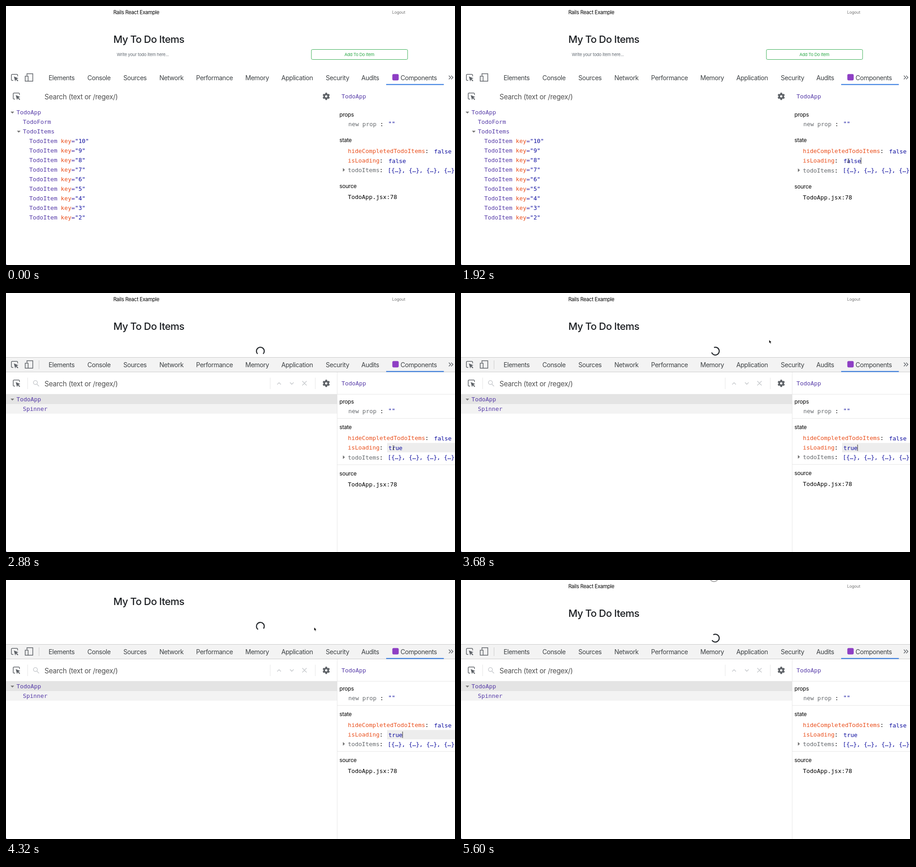
An HTML page for the animation above (5.76 s loop, 985 by 569 pixels).

```html
<!DOCTYPE html>
<html lang="en">
<head>
<meta charset="utf-8">
<title>To do items with component inspector</title>
<style>
html, body { margin: 0; width: 100%; height: 100%; overflow: hidden; background: #fff; }
svg { display: block; width: 985px; height: 569px; }
text { font-family: Inter, Roboto, sans-serif; white-space: pre; }
.brand { font-size: 11.2px; letter-spacing: -.28px; fill: #000; }
.logout { font-size: 9px; letter-spacing: -.15px; fill: #777; }
.title { font-size: 22px; font-weight: 500; letter-spacing: -.57px; fill: #1b1e22; }
.form { font-size: 9.4px; letter-spacing: -.22px; fill: #626a72; }
.tab { font-size: 13.9px; letter-spacing: -.4px; fill: #3c4043; }
.search { font-size: 15.2px; letter-spacing: -.28px; fill: #505050; }
.label { font-size: 12px; letter-spacing: -.2px; fill: #000; }
.mono { font: 12.8px "DejaVu Sans Mono", monospace; fill: #000; }
.name { fill: #563ba8; }
.attr { fill: #ea4f1c; }
.value { fill: #0d0d9f; }
.dim { fill: #666a6e; }
.icon { fill: none; stroke: #5f6368; stroke-width: 1.5; }
.faint { fill: none; stroke: #c3c6ca; stroke-width: 1.4; }
.line { fill: none; stroke: #e6e6e6; }
</style>
</head>
<body>
<svg viewBox="0 0 985 569">
  <g id="page">
    <text class="brand" x="235.5" y="18">Rails React Example</text>
    <text class="logout" x="847" y="17.3">Logout</text>
    <text class="title" x="235.5" y="81">My To Do Items</text>
    <g id="form">
      <text class="form" x="243" y="110">Write your todo item here...</text>
      <rect x="670" y="95.5" width="211" height="22" rx="2.5" fill="#fff" stroke="#3aae55"/>
      <text class="form" x="775.3" y="110" text-anchor="middle" style="fill:#28a745">Add To Do Item</text>
    </g>
    <path id="spinner" d="M6.1 6.1A8.6 8.6 0 1 1 6.1 -6.1" fill="none" stroke="#212529" stroke-width="2.3"/>
  </g>
  <circle id="ring" cx="555" cy="-6.3" r="10" fill="#fff" stroke="#555"/>

  <rect y="141" width="985" height="428" fill="#fff"/>
  <g id="chrome">
    <rect y="141" width="985" height="32.5" fill="#f3f3f3"/>
    <path d="M0 141.5H985M0 173.5H985M72.5 148V167" stroke="#cbcbcb"/>
    <path class="line" d="M47.5 186V211M579.5 186V211M678.5 186V211M726.5 174V569M0 222.5H985M727 275.5H985"/>
    <path class="faint" d="M67.5 200L72.5 205M595 201L599 197L603 201M623 196.5L627 200.5L631 196.5M650 193.5L659.5 203M659.5 193.5L650 203"/>
    <circle class="faint" cx="64.5" cy="196.7" r="4.3"/>
    <rect y="223" width="726" height="21" fill="#e4e4e4"/>
    <rect y="244" width="726" height="21" fill="#f3f3f3"/>
  </g>

  <g id="picker">
    <path class="icon" d="M5 14H2.5Q.8 14 .8 12.3V2.5Q.8 .8 2.5 .8H12.8Q14.5 .8 14.5 2.5V5"/>
    <path d="M6.3 5.3L16.2 9.3L12.3 10.8L16 14.5L14.5 16L10.8 12.3L9.2 16.2Z" fill="#5f6368"/>
  </g>
  <use href="#picker" x="4" y="41"/>
  <path class="icon" d="M46 153V148.7H58.7V165.3H49M42.2 154.2H48.5V165.3H42.2Z"/>
  <g id="tabs"></g>
  <rect x="847.5" y="149.5" width="14" height="14" rx="3" fill="#8e3fc4"/>
  <rect x="834" y="171.5" width="126.5" height="2" fill="#2b74de"/>
  <path class="icon" d="M971.5 153L975.5 157L971.5 161M976.5 153L980.5 157L976.5 161"/>
  <text class="search" x="84.5" y="204.5">Search (text or /regex/)</text>
  <g transform="translate(702.5 198.5)">
    <g id="teeth" fill="#5f6368"></g>
    <circle r="4.3" fill="none" stroke="#5f6368" stroke-width="3.4"/>
  </g>

  <path d="M10 232H18L14 236.3Z" fill="#777"/>
  <text class="mono name" x="23" y="238">TodoApp</text>
  <g id="tree"><path d="M24 274H32L28 278.3Z" fill="#777"/></g>
  <text id="loading" class="mono name" x="37" y="259">Spinner</text>

  <text class="mono name" x="736" y="203">TodoApp</text>
  <text class="label" x="731.5" y="243">props</text>
  <text class="mono dim" x="751" y="264">new prop</text>
  <text class="mono" x="820.5" y="264">:</text>
  <text class="mono value" x="838.5" y="263">""</text>
  <text class="label" x="731.5" y="299">state</text>
  <text class="mono attr" x="750" y="323">hideCompletedTodoItems<tspan fill="#000">:</tspan></text>
  <text class="mono value" x="939" y="323.5">false</text>
  <text class="mono attr" x="750" y="344">isLoading<tspan fill="#000">:</tspan></text>
  <rect id="field" x="836" y="329.5" width="149" height="20.5" fill="#ededed"/>
  <rect id="selection" x="839" y="332" width="38.5" height="15.5" fill="#b3d7ff"/>
  <text id="flag" class="mono value" x="839" y="344.5"></text>
  <path id="caret" d="M0 333V347" stroke="#222"/>
  <g id="lower">
    <path id="rule" class="line" d="M727 376.5H985"/>
    <path d="M739 356L743.5 360L739 364Z" fill="#777"/>
    <text class="mono dim" x="750" y="365">todoItems<tspan fill="#000">:</tspan></text>
    <text class="mono value" x="837.5" y="364.5">[{…}, {…}, {…}, {…}</text>
    <text class="label" x="731.5" y="400">source</text>
    <text class="mono" x="750" y="424">TodoApp.jsx:78</text>
  </g>
  <circle cy="569" r="1.5" fill="#34309a"/>

  <path id="arrow" d="M0 0V7.2L1.7 5.7L2.9 8.4L4.2 7.8L3 5.2H5.2Z" fill="#000" stroke="#fff" stroke-width=".5"/>
  <path id="beam" d="M-2 -4.5Q0 -4.5 0 -3Q0 -4.5 2 -4.5M0 -3V3M-2 4.5Q0 4.5 0 3Q0 4.5 2 4.5M-1.3 1H1.3" fill="none" stroke="#333" stroke-width=".9"/>
</svg>
<script>
const LOOP = 5760, STEP = 160;
const LOAD = 2880, BLUR = 5120;
const $ = id => document.getElementById(id);
const show = (id, on) => $(id).style.display = on ? "" : "none";
const move = (id, x, y) => $(id).setAttribute("transform", `translate(${x} ${y})`);
const ease = (t, a, b) => {
  const p = Math.min(1, Math.max(0, (t - a) / (b - a)));
  return p * p * (3 - 2 * p);
};
const mix = (a, b, p) => a + (b - a) * p;

function addText(parent, cls, x, y, html) {
  const el = document.createElementNS("http://www.w3.org/2000/svg", "text");
  el.setAttribute("class", cls);
  el.setAttribute("x", x);
  el.setAttribute("y", y);
  el.innerHTML = html;
  $(parent).append(el);
}

function build() {
  move("picker", 11, 149.5);
  const tabs = { Elements: 93.5, Console: 178.5, Sources: 257.5, Network: 336.5, Performance: 417,
    Memory: 525, Application: 604, Security: 701.5, Audits: 779.5, Components: 865.5 };
  for (const [name, x] of Object.entries(tabs)) addText("tabs", "tab", x, 162.5, name);

  addText("tree", "mono name", 37, 259, "TodoForm");
  addText("tree", "mono name", 37, 280, "TodoItems");
  for (let key = 10; key > 1; key--) {
    addText("tree", "mono name", 51, 301 + (10 - key) * 21,
      `TodoItem <tspan class="attr">key</tspan>=<tspan class="value">"${key}"</tspan>`);
  }
  for (let a = 0; a < 360; a += 60) {
    $("teeth").innerHTML += `<path transform="rotate(${a})" d="M-2.6 -4.5L-1.7 -8H1.7L2.6 -4.5Z"/>`;
  }
}

// Pointer path: in from below, up to the page, out through the top.
function pointer(t) {
  if (t < LOAD) {
    const p = ease(t, 0, 1120);
    return [mix(925, 850, p), mix(575, 340, p)];
  }
  if (t < 4960) {
    const p = ease(t, LOAD, 3680);
    return [mix(850, 676, p), mix(340, 103, p) + ease(t, 4000, 4320)];
  }
  const p = ease(t, 4960, 5600);
  return [mix(676, 555, p), mix(104, -10, p)];
}

function draw(ms) {
  const t = Math.floor(ms / STEP) * STEP;
  const loading = t >= LOAD;
  const focused = t >= 1920 && t < BLUR;

  show("form", !loading);
  show("tree", !loading);
  for (const id of ["spinner", "chrome", "rule", "loading"]) show(id, loading);
  move("page", 0, -26 * (ease(t, 3840, 4320) - ease(t, 4480, 4960)));
  $("spinner").setAttribute("transform",
    `translate(558 127.7) rotate(${90 + 239 * (t - LOAD) / STEP})`);
  show("ring", t >= 5600);

  const typed = t >= 2400;
  $("flag").textContent = typed ? "true" : "false";
  show("field", loading && focused);
  show("selection", t >= 2080 && !typed);
  const blink = loading ? t / STEP % 2 === 1 : t < 2080 || typed;
  show("caret", focused && blink);
  move("caret", typed ? 870 : 877.5, 0);
  move("lower", 0, t >= 1920 && t < 3040 ? 0.8 : 0);

  const [x, y] = pointer(t);
  const overText = x > 838 && x < 880 && y > 330 && y < 350;
  show("beam", overText);
  show("arrow", !overText && t > 0);
  move("beam", x, y);
  move("arrow", x, y);
}

build();
const start = performance.now();
function tick() {
  draw((performance.now() - start) % LOOP);
  requestAnimationFrame(tick);
}
tick();
</script>
</body>
</html>
```
